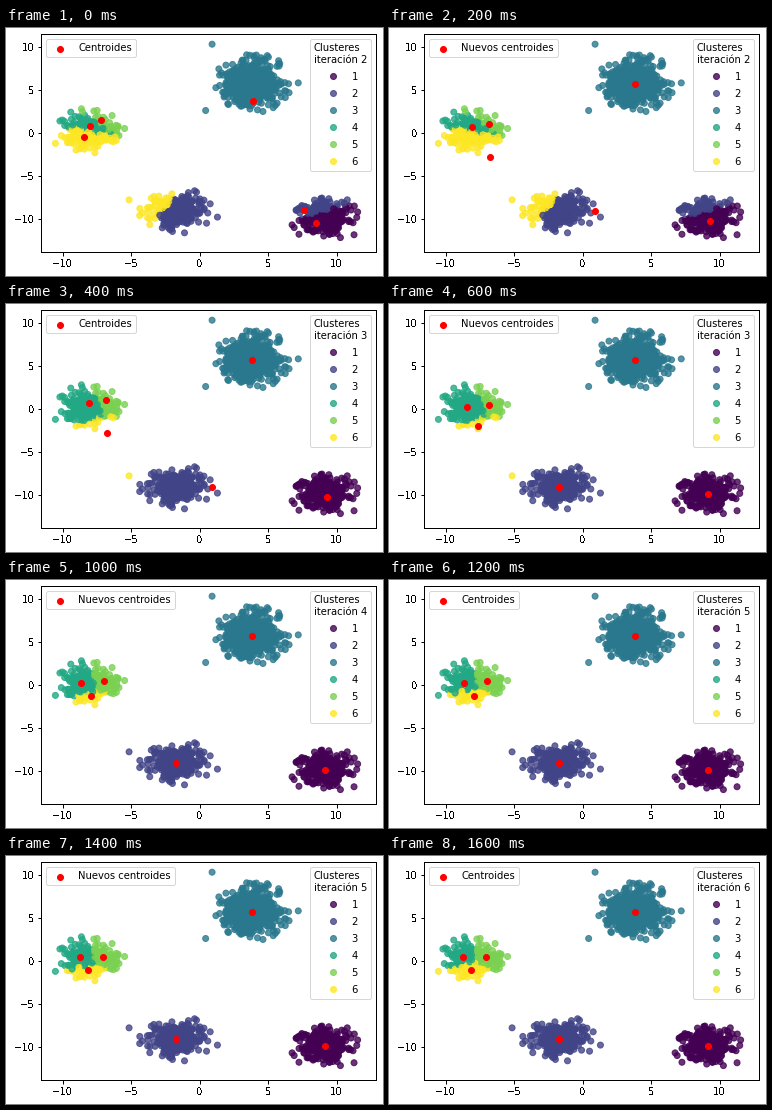
These frames come from a looping animation (377 px wide and 248 px high, 1.8 s). A matplotlib script:

```python
import numpy as np
import matplotlib.pyplot as plt
from matplotlib.animation import FuncAnimation

W, H, DPI = 377, 248, 72
LEFT, BOTTOM, AX_W, AX_H = 35.4, 24.2, 334.8, 217.44
STEP_MS = 200
STEPS = 9

plt.rcParams.update({
    "font.family": "DejaVu Sans", "font.size": 10,
    "axes.linewidth": 1, "xtick.major.width": 1, "ytick.major.width": 1,
})
rng = np.random.default_rng(7)


def blob(center, count, spread=0.97, reach=3.0):
    """Round Gaussian cloud, centred exactly and cut at a given reach."""
    unit = rng.normal(size=(2 * count, 2))
    unit = unit[np.hypot(*unit.T) < reach][:count]
    return np.array(center) + (unit - unit.mean(axis=0)) * spread


def nearest(centers):
    gaps = points[:, None, :] - centers[None, :, :]
    return (gaps ** 2).sum(axis=2).argmin(axis=1)


def means(labels):
    return np.array([points[labels == k].mean(axis=0) for k in range(6)])


strays = [(0.91, 10.28), (0.44, 2.6), (7.2, 5.8), (-5.15, -7.75), (1.3, -9.75)]
points = np.vstack([
    blob((3.83, 5.72), 600, spread=(1.05, 1.24)),
    blob((-7.96, 0.16), 240),
    blob((-1.71, -9.0), 240),
    blob((9.13, -9.8), 240),
    strays,
])

# K-means: each round assigns the points, then moves the centroids.
centroids = [np.array([(8.51, -10.38), (7.64, -8.88), (3.9, 3.75),
                       (-8.0, 0.85), (-7.18, 1.55), (-8.42, -0.42)])]
labels = []
for _ in range(STEPS // 2 + 1):
    labels.append(nearest(centroids[-1]))
    centroids.append(means(labels[-1]))

fig = plt.figure(figsize=(W / DPI, H / DPI), dpi=DPI, facecolor="white")
ax = fig.add_axes([LEFT / W, BOTTOM / H, AX_W / W, AX_H / H])
ax.set_xlim(-11.55, 12.89)
ax.set_ylim(-13.77, 11.42)
ax.set_xticks(range(-10, 11, 5))
ax.set_yticks(range(-10, 11, 5))
for text in ax.get_xticklabels() + ax.get_yticklabels():
    text.set_antialiased(False)

cloud = ax.scatter(*points.T, c=labels[0] + 1, cmap="viridis",
                   vmin=1, vmax=6, alpha=0.8)
marks = ax.scatter(*centroids[0].T, c="red", label="Centroides")

cluster_key = ax.legend(*cloud.legend_elements(), loc="upper right",
                        title="Clusteres\niteración 2")
ax.add_artist(cluster_key)
mark_key = ax.legend(handles=[marks], loc="upper left")


def draw(i):
    rnd, moved = divmod(i, 2)
    cloud.set_array(labels[rnd] + 1)
    marks.set_offsets(centroids[rnd + moved])
    cluster_key.get_title().set_text(f"Clusteres\niteración {rnd + 2}")
    name = "Nuevos centroides" if moved else "Centroides"
    mark_key.get_texts()[0].set_text(name)
    return cloud, marks, cluster_key, mark_key


anim = FuncAnimation(fig, draw, frames=STEPS, interval=STEP_MS,
                     repeat=True, repeat_delay=0, blit=False)
plt.show()
```
